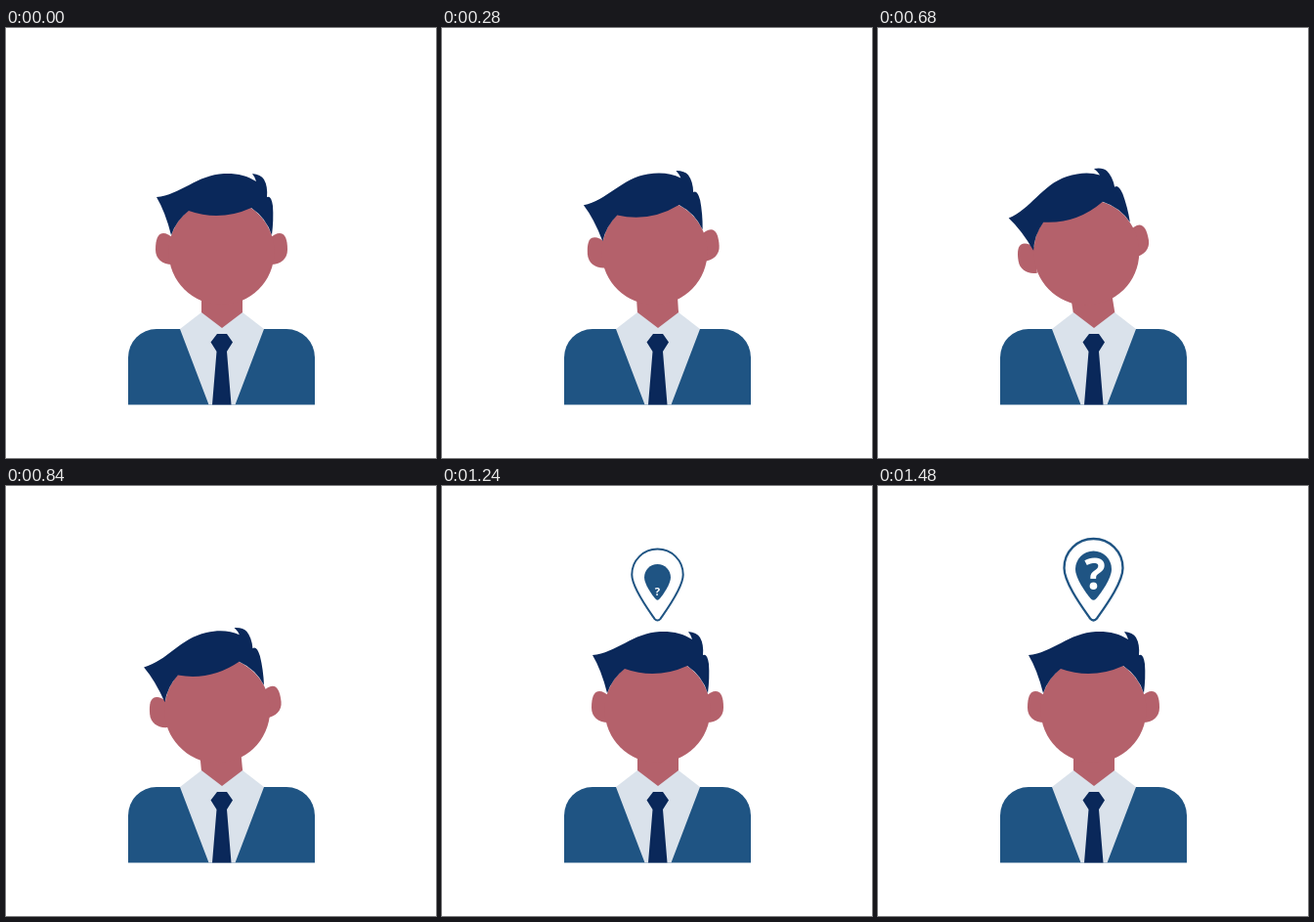
These frames come from a looping animation (440x440 px, 2 s). An HTML page:

```html
<!DOCTYPE html>
<html lang="en">
<head>
<meta charset="utf-8">
<title>Wondering man</title>
<style>
  html, body { margin: 0; height: 100%; overflow: hidden; background: #fff; }
  svg { display: block; width: 100vw; height: 100vh; }
  .skin { fill: #b4616b; }
  .navy { fill: #0a285a; }
  .blue { fill: #1f5483; }
  .shirt { fill: #dae2eb; }
  .outline { fill: #fff; stroke: #1f5483; stroke-width: 2.3; }
  text { font: 700 45px "Open Sans", "Noto Sans", sans-serif; fill: #fff; text-anchor: middle; }
</style>
</head>
<body>
<svg viewBox="0 0 440 440">
  <g id="head" class="skin">
    <path d="M200 265H242V310H200Z"/>
    <path id="ear" d="M172 216Q164 208.500 158.500 210.500C154 212.500 153 220 153 227C153 236 160 242 170 242Z"/>
    <use href="#ear" transform="matrix(-1 0 0 1 441 0)"/>
    <g id="face">
      <circle cx="220.500" cy="229" r="54"/>
      <path class="navy" d="M154 173C178 171 196 150 223 149C236 148.500 247 151 256 157Q255 153 252 149Q261 150 264 155Q268 162 267 173Q271.500 171 273 182Q274 196 272 212A54 54 0 0 0 251 184Q219 198.500 187 187A54 54 0 0 0 169 212Q163 188 154 173Z"/>
    </g>
  </g>

  <path class="blue" d="M125 385.500V337A29 29 0 0 1 154 308H287A29 29 0 0 1 316 337V385.500Z"/>
  <path class="skin" d="M200 291H242L221 310Z"/>
  <path class="shirt" d="M178 308L200 291L221 307L242 291L264 308L234.500 385.500H207.500Z"/>
  <path class="navy" d="M216 313H226L232 321.500L226 331L230.500 385.500H211L215.500 331L209.500 321.500Z"/>

  <path id="pin" class="outline" d="M220.500 54C237 54 250.500 67 250.500 84C250.500 99 232 124 224 135.500Q220.500 139.500 217 135.500C209 124 190.500 99 190.500 84C190.500 67 204 54 220.500 54Z"/>
  <path id="drop" class="blue" d="M220.500 66.500C231 66.500 239 75 239 85C239 94 229 109 223 115.500Q220.500 118 218 115.500C212 109 202 94 202 85C202 75 210 66.500 220.500 66.500Z"/>
  <text id="mark" x="222" y="106">?</text>
</svg>
<script>
  const LOOP = 2000, STEP = 40;
  const $ = id => document.getElementById(id);

  // Piecewise linear value at time t through [time, value] points
  function track(t, points) {
    if (t <= points[0][0]) return points[0][1];
    for (let i = 1; i < points.length; i++) {
      const [t0, a] = points[i - 1], [t1, b] = points[i];
      if (t <= t1) return a + (b - a) * (t - t0) / (t1 - t0);
    }
    return points[points.length - 1][1];
  }

  function rotate(id, angle, x, y) {
    $(id).setAttribute("transform", `rotate(${angle} ${x} ${y})`);
  }

  function grow(id, scale, x, y) {
    $(id).style.display = scale > 0 ? "" : "none";
    $(id).setAttribute("transform", `translate(${x} ${y}) scale(${scale}) translate(${-x} ${-y})`);
  }

  const pop = (t, start) => track(t, [[start, 0], [start + 320, 1.165], [start + 400, 1]]);

  function draw(t) {
    const tilt = track(t, [[0, 0], [680, 1], [1080, 0]]);
    rotate("head", -9.15 * tilt, 220.5, 291);
    rotate("face", -7.2 * tilt, 223, 208);
    grow("pin", pop(t, 1000), 220.5, 138);
    grow("drop", pop(t, 1040), 220.5, 116.5);
    grow("mark", track(t, [[1160, 0], [1480, 1]]), 220, 114);
  }

  const begin = performance.now();
  function tick() {
    const t = (performance.now() - begin) % LOOP;
    draw(Math.floor(t / STEP) * STEP);
    requestAnimationFrame(tick);
  }
  tick();
</script>
</body>
</html>
```
